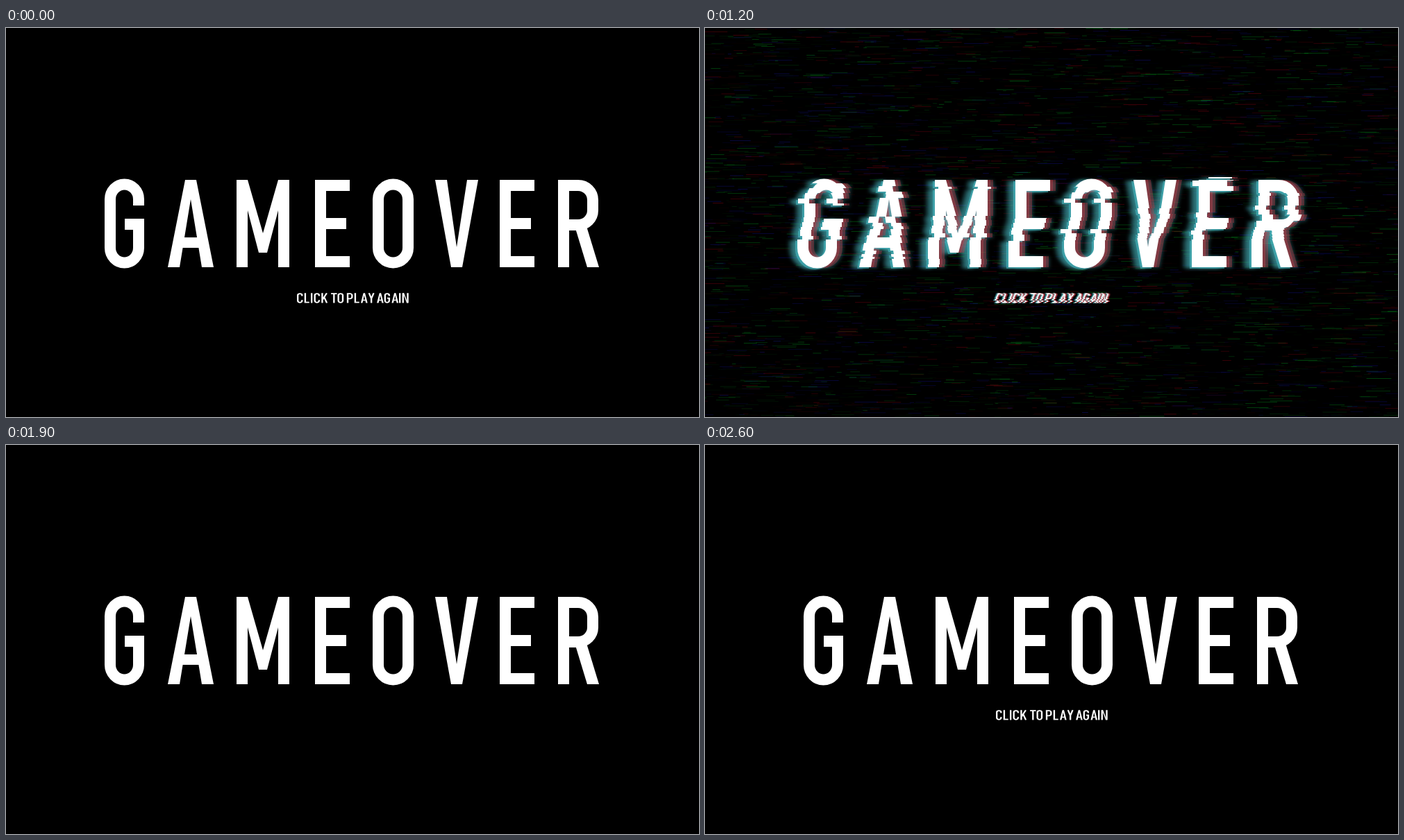
An HTML page with a canvas that plays this animation: 998x561 px, repeating every 2.8 s.

```html
<!DOCTYPE html>
<html lang="en">
<head>
<meta charset="utf-8">
<title>Game over</title>
<style>
html, body { margin: 0; height: 100%; overflow: hidden; background: #000; }
canvas { display: block; }
</style>
</head>
<body>
<canvas id="stage" width="998" height="561" role="img" aria-label="GAMEOVER. CLICK TO PLAY AGAIN"></canvas>
<script>
const W = 998, H = 561, LOOP = 2800;

// Condensed capitals, 126 units tall: [width, stroked path, filled path]
const GLYPHS = {
  A: [66, '', 'M0 126L25 0H41L66 126H49L44.4 98H21.6L17 126ZM33 28L24 83H42Z'],
  C: [58, 'M50 38V28A21 21.5 0 0 0 8 28V98A21 21.5 0 0 0 50 98V88'],
  E: [50, 'M50 8H8V118H50M8 63H45'],
  G: [58, 'M49 37V28A20.5 21.5 0 0 0 8 28V98A20.5 21.5 0 0 0 49 98V64H29'],
  I: [16, 'M8 0V126'],
  K: [62, 'M8 0V126M10 84L52 0M27 52L53 126'],
  L: [48, 'M8 0V118H48'],
  M: [76, '', 'M0 0H16L38 77L60 0H76V126H60V44L44 105H32L16 44V126H0Z'],
  N: [62, 'M8 0V126M54 0V126', 'M8 0H18L54 126H44Z'],
  O: [59, 'M8 28A21.5 21.5 0 0 1 51 28V98A21.5 21.5 0 0 1 8 98Z'],
  P: [59, 'M8 126V8H30A21 21 0 0 1 51 29V50A21 21 0 0 1 30 71H8'],
  R: [59, 'M8 126V8H29A21 21 0 0 1 50 29V44A21 21 0 0 1 29 65H8', 'M25 70L41 67L59 126H42Z'],
  T: [58, 'M0 8H58M29 8V126'],
  V: [62, '', 'M0 0H17L31 97L46 0H62L39 126H23Z'],
  Y: [62, 'M8 0L31 70L54 0M31 66V126'],
  ' ': [2, '']
};
const TITLE = 'GAMEOVER', TITLE_X = [142, 233, 332, 445, 528, 618, 711, 795];

let seed = 7;
const rnd = () => (seed = (seed * 16807) % 2147483647) / 2147483647;
const between = (a, b) => a + (b - a) * rnd();

function layer(paint) {
  const c = document.createElement('canvas');
  c.width = W;
  c.height = H;
  paint(c.getContext('2d'));
  return c;
}

function letter(g, ch, x, y, sx, sy) {
  const [, line, shape] = GLYPHS[ch];
  g.save();
  g.translate(x, y);
  g.scale(sx, sy);
  g.lineWidth = 16;
  g.strokeStyle = g.fillStyle = '#fff';
  if (line) g.stroke(new Path2D(line));
  if (shape) g.fill(new Path2D(shape), ch === 'A' ? 'evenodd' : 'nonzero');
  g.restore();
}

const title = layer(g => [...TITLE].forEach((ch, i) => letter(g, ch, TITLE_X[i], 219, 1, 1)));

const prompt = layer(g => {
  let x = 419;
  for (const ch of 'CLICK TO PLAY AGAIN') {
    letter(g, ch, x, 382.3, .147, .113);
    x += GLYPHS[ch][0] * .147 + ('ATY'.includes(ch) ? .9 : 2.2);
  }
});

const noise = layer(g => {
  for (let i = 0; i < 6000; i++) {
    const hue = rnd();
    g.fillStyle = hue < .45 ? '#0f3' : hue < .75 ? '#22f' : '#f02';
    g.globalAlpha = .03 + .25 * rnd() ** 3;
    g.fillRect(between(-30, W), rnd() * H, between(4, 36), .9);
  }
});

// Copies a region in horizontal bands, each moved sideways by shift(y)
function slice(g, src, x, y, w, h, bands, shift) {
  for (let top = y; top < y + h;) {
    const band = Math.min(Math.round(between(...bands)), y + h - top);
    g.drawImage(src, x, top, w, band, x + shift(top), top, w, band);
    top += band;
  }
}

const tornTitle = layer(g => TITLE_X.forEach((x, i) => {
  const left = x - 16, width = (TITLE_X[i + 1] || 880) - x, lean = between(-2, 2);
  slice(g, title, left, 214, width, 136, [3, 9], y => {
    const drop = Math.min(1, Math.max(0, (y - 270) / 35));
    const jump = rnd() < .25 ? between(-10, 8) : 0;
    return Math.round(lean - 10 * drop + jump);
  });
  if (i === 6) g.drawImage(title, 711, 219, 34, 2, 725, 215, 34, 2);
}));

const tornPrompt = layer(g => slice(g, prompt, 415, 380, 170, 19, [1, 2],
  y => (389 - y) * .12 + between(-1.5, 1.5)));

const tint = (src, colour) => layer(g => {
  g.drawImage(src, 0, 0);
  g.globalCompositeOperation = 'source-in';
  g.fillStyle = colour;
  g.fillRect(0, 0, W, H);
});

const glitch = layer(g => {
  const ghost = (src, alpha, blur, moves) => {
    g.globalAlpha = alpha;
    g.filter = blur ? `blur(${blur}px)` : 'none';
    for (const [dx, dy] of moves) g.drawImage(src, dx, dy);
  };
  ghost(tint(tornTitle, '#4cc3cc'), .3, 2.5, [[-13, 1], [-9, 2], [-5, 1], [9, 1]]);
  ghost(tint(tornTitle, '#d83a48'), .33, 0, [[8, 0], [4, 0]]);
  ghost(tint(tornTitle, '#4cc3cc'), .5, 0, [[-3, 2]]);
  ghost(tint(tornPrompt, '#4cc3cc'), .75, 0, [[-2, .5]]);
  ghost(tint(tornPrompt, '#d83a48'), .75, 0, [[2, 0]]);
  ghost(tornTitle, 1, 0, [[0, 0]]);
  ghost(tornPrompt, 1, 0, [[0, 0]]);
});

// [start ms, text brightness, prompt shown, glitch opacity, noise opacity]
const SCENES = [
  [0, 1, 1, 0, 0],
  [500, 1, 0, 0, 0],
  [1000, 1, 1, 0, 1],
  [1100, .78, 1, .6, .7],
  [1200, 0, 0, 1, 1],
  [1300, .78, 1, .6, .5],
  [1400, 1, 1, 0, 0],
  [1900, 1, 0, 0, 0],
  [2400, .78, 1, .6, .5],
  [2500, 0, 0, 1, 1],
  [2600, 1, 1, 0, 0]
];

const ctx = document.getElementById('stage').getContext('2d');
const start = performance.now();

function draw() {
  const t = Math.max(0, performance.now() - start) % LOOP;
  const [, light, hasPrompt, torn, grain] = SCENES.findLast(s => s[0] <= t);
  ctx.globalAlpha = 1;
  ctx.filter = 'none';
  ctx.fillStyle = '#000';
  ctx.fillRect(0, 0, W, H);
  ctx.globalAlpha = grain;
  ctx.drawImage(noise, 0, 0);
  ctx.globalAlpha = torn;
  ctx.drawImage(glitch, 0, 0);
  if (light) {
    ctx.globalAlpha = 1;
    if (light < 1) ctx.filter = `brightness(${light})`;
    ctx.drawImage(title, 0, 0);
    if (hasPrompt) ctx.drawImage(prompt, 0, 0);
  }
  requestAnimationFrame(draw);
}
draw();
</script>
</body>
</html>
```
